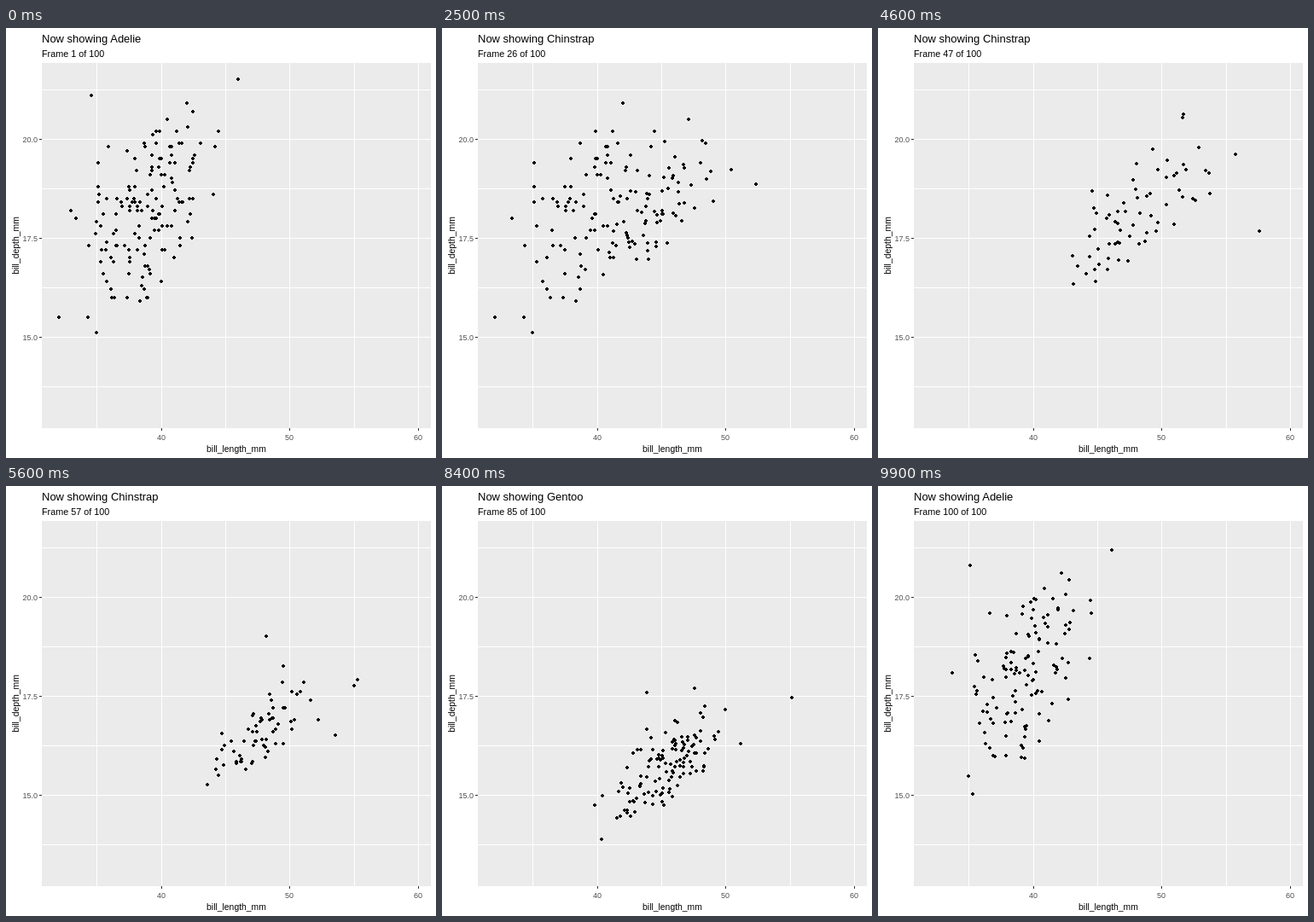
An HTML page for the animation above (10000 ms loop, 504 by 504 pixels).

```html
<!DOCTYPE html>
<html lang="en">
<head>
<meta charset="utf-8">
<title>Bill sizes by species</title>
<style>
  html, body { margin: 0; width: 100%; height: 100%; overflow: hidden; background: #fff; }
  svg { display: block; width: 504px; height: 504px; font-family: "Liberation Sans", Arial, sans-serif; }
</style>
</head>
<body>
<svg id="chart" viewBox="0 0 504 504"></svg>
<script>
const chart = document.getElementById('chart');
const FRAMES = 100, FRAME_MS = 100;

// Each species is a sloping cloud: birds vary in size along `slope`, plus noise.
const SPECIES = [
  { name: 'Adelie', count: 151, centre: [38.8, 18.3], slope: [1.6, 0.72], spread: [1.9, 0.95] },
  { name: 'Chinstrap', count: 68, centre: [48.7, 18.4], slope: [2.4, 0.85], spread: [1.3, 0.55] },
  { name: 'Gentoo', count: 122, centre: [47.3, 14.95], slope: [2.2, 0.62], spread: [1.5, 0.45] }
];

// Each change of state: species, frames it spans, frame where the title flips.
const MOVES = [
  { from: 0, to: 1, start: 11, end: 33, flip: 23 },
  { from: 1, to: 2, start: 45, end: 67, flip: 57 },
  { from: 2, to: 0, start: 79, end: 100, flip: 90 }
];

// The few birds that stand clear of the clouds, one spot per species.
const STANDOUTS = [
  [[46, 21.5], [49.2, 18.2], [48.7, 15.1]],
  [[42.5, 20.7], [58, 17.8], [49.2, 15.2]],
  [[40.9, 18.9], [51, 18.8], [59.6, 17]],
  [[42.2, 18.5], [52, 20.7], [44.4, 17.3]],
  [[41.1, 18.2], [55.8, 19.8], [54.3, 15.7]],
  [[34.6, 21.1], [45.9, 17.1], [45.8, 14.6]]
];
const SMALLEST = [[32.1, 15.5], null, null];

const xPos = mm => Math.round(181.54 + (mm - 40) * 15.07);
const yPos = mm => Math.round(130.05 + (20 - mm) * 46.4);

function add(tag, attrs, text = '') {
  const node = document.createElementNS('http://www.w3.org/2000/svg', tag);
  for (const key in attrs) node.setAttribute(key, attrs[key]);
  node.textContent = text;
  return chart.appendChild(node);
}

const box = (x, y, width, height, fill) => add('rect', { x, y, width, height, fill });
const label = (x, y, size, text, extra) =>
  add('text', { x, y, 'font-size': size, ...extra }, text);

function drawAxes() {
  box(42, 41, 456, 428, '#ebebeb');
  for (let mm = 35; mm <= 60; mm += 5) box(xPos(mm), 41, 1, 428, '#fff');
  for (let mm = 13.75; mm < 22; mm += 1.25) box(42, yPos(mm), 456, 1, '#fff');
  for (let mm = 40; mm <= 60; mm += 10) {
    box(xPos(mm), 469, 1, 3, '#333');
    label(xPos(mm), 483, 9, mm, { 'text-anchor': 'middle', fill: '#4d4d4d' });
  }
  for (let mm = 15; mm <= 20; mm += 2.5) {
    box(39, yPos(mm), 3, 1, '#333');
    label(37, yPos(mm) + 4, 9, mm.toFixed(1), { 'text-anchor': 'end', fill: '#4d4d4d' });
  }
  label(270, 497, 10.4, 'bill_length_mm', { 'text-anchor': 'middle' });
  label(0, 0, 10.4, 'bill_depth_mm', { 'text-anchor': 'middle', transform: 'translate(15 255) rotate(-90)' });
}

let seed = 20;
function random() {
  seed = (seed + 0x6d2b79f5) | 0;
  let n = Math.imul(seed ^ (seed >>> 15), seed | 1);
  n ^= n + Math.imul(n ^ (n >>> 7), n | 61);
  return ((n ^ (n >>> 14)) >>> 0) / 4294967296;
}
const noise = () => (random() + random() - 1) * 2.45;

// A random spot in the cloud, measured to a tenth of a millimetre.
function scatter({ centre, slope, spread }) {
  const size = (random() * 2 - 1) * 1.73;
  return centre.map((c, k) => Math.round((c + size * slope[k] + noise() * spread[k]) * 10) / 10);
}

function buildBirds() {
  const birds = [...STANDOUTS];
  while (birds.length < SPECIES[0].count - 1) {
    const row = birds.length;
    birds.push(SPECIES.map(s => row < s.count ? scatter(s) : null));
  }
  return [...birds, SMALLEST];
}

drawAxes();
const title = label(42, 17, 13, '');
const subtitle = label(42, 34, 10.8, '');
const birds = buildBirds();
const dots = birds.map(() => add('path', { d: 'M-1-2h2v1h1v2h-1v1h-2v-1h-1v-2h1z' }));

// Birds without a partner hold still until the move ends, or appear at its end.
function place(bird, move, progress) {
  const a = bird[move.from], b = bird[move.to];
  return a && b ? a.map((v, k) => v + (b[k] - v) * progress) : a;
}

function render(ms) {
  const frame = Math.floor(ms / FRAME_MS) % FRAMES;
  const move = MOVES.find(m => frame < m.end);
  const progress = Math.max(0, (frame - move.start) / (move.end - move.start));
  title.textContent = 'Now showing ' + SPECIES[frame < move.flip ? move.from : move.to].name;
  subtitle.textContent = `Frame ${frame + 1} of ${FRAMES}`;
  dots.forEach((dot, i) => {
    const spot = place(birds[i], move, progress);
    dot.setAttribute('visibility', spot ? 'visible' : 'hidden');
    if (spot) dot.setAttribute('transform', `translate(${xPos(spot[0])} ${yPos(spot[1])})`);
  });
}

const began = performance.now();
function tick() {
  render(performance.now() - began);
  requestAnimationFrame(tick);
}
tick();
</script>
</body>
</html>
```
